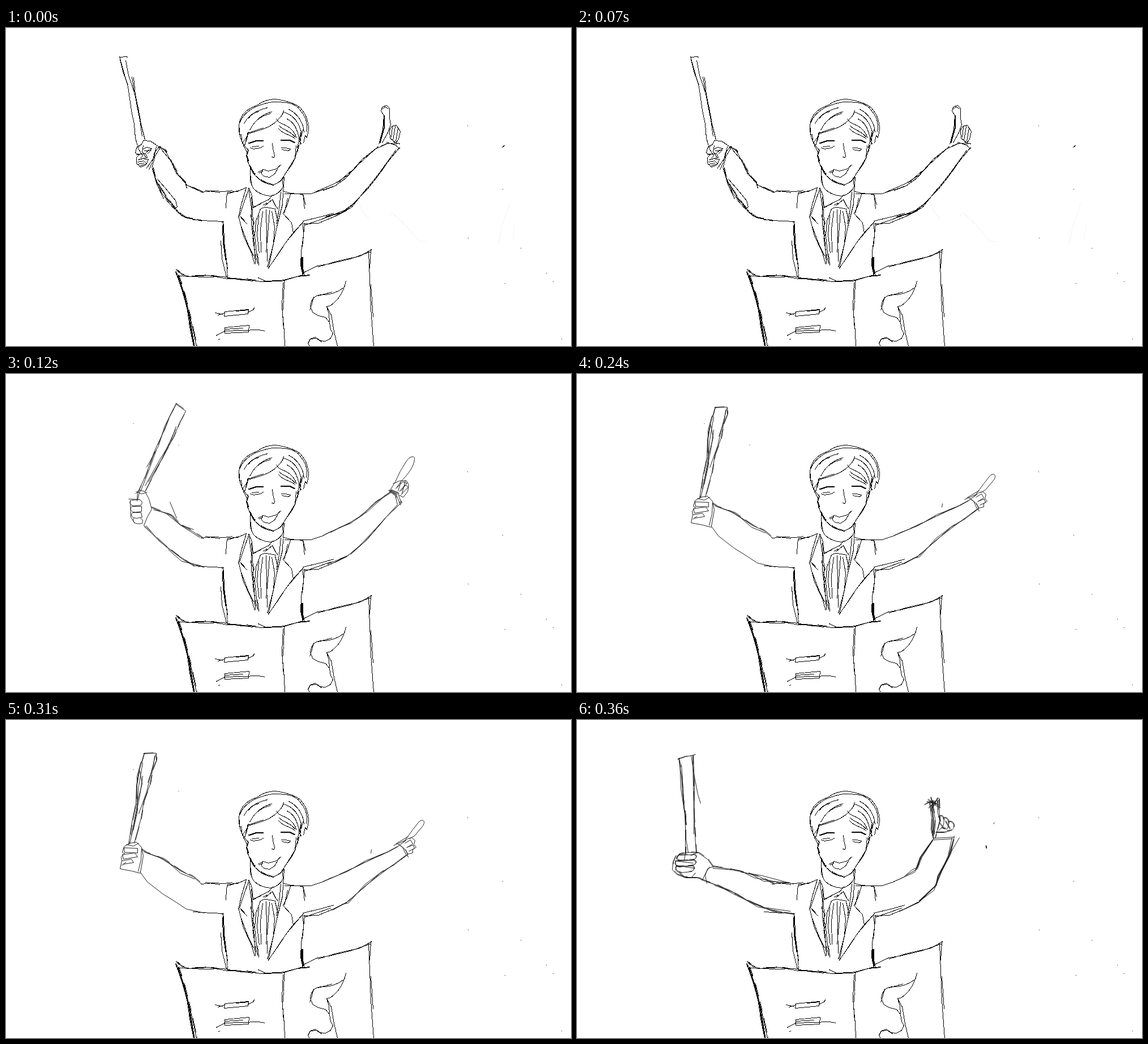
Animation of 998 by 561 pixels, one loop 480 ms. Source, as an HTML page:

```html
<!DOCTYPE html>
<html lang="en">
<head>
<meta charset="utf-8">
<title>Conductor</title>
<style>
html, body { margin: 0; width: 100%; height: 100%; overflow: hidden; background: #fff; }
svg { display: block; width: 998px; height: 561px; }
path { fill: none; stroke: #000; stroke-width: 1; shape-rendering: crispEdges; }
.soft path { stroke: #222; shape-rendering: auto; }
path.bold { stroke-width: 2; }
path.heavy { stroke-width: 4; }
path.faint { stroke: #f3f3f3; }
path.retrace { stroke-dasharray: 17 13 25 9; }
</style>
</head>
<body>
<svg viewBox="0 0 998 561">
<g transform="translate(.5 .5)">
  <g id="head">
    <path d="M420 207 C413 195 409 181 412 165 C416 149 428 141 443 136 C454 127 466 125 476 125 C491 127 510 132 519 140 C529 151 536 166 533 185 L531 193 L528 189 L525 203"/>
    <path d="M413 192 L411 170 C417 153 425 148 437 140 C455 132 472 127 489 131 C504 131 515 137 521 147 C529 156 533 167 530 183"/>
    <path d="M427 186 C444 181 466 176 478 163 C485 157 490 151 490 144 M426 185 C435 183 446 177 455 176 M430 180 C438 164 450 152 470 147 M440 165 C449 155 459 153 468 150 M420 169 C424 157 439 145 462 140 M427 160 C433 151 439 148 447 147"/>
    <path d="M477 160 L482 166 C493 171 507 175 513 194 M482 172 C489 180 503 181 511 193 M481 177 C489 188 504 187 511 196 M490 148 C505 152 519 165 522 190 M499 143 C514 150 525 166 526 184 M496 160 C510 167 514 179 518 197 M514 211 L521 181 L519 206 M525 177 L518 200 L522 205 M415 187 L417 203 L425 191"/>
    <path class="rough" d="M427 184 L421 207 L427 216 L424 225 L429 241 C433 254 444 267 458 273 L471 277 L484 270 L496 252 C508 237 512 225 516 207"/>
    <path d="M419 207 L425 218 L426 234 L437 257 L452 271 M512 207 L510 229 L499 247 L491 259 L488 269"/>
    <path class="bold" d="M428 203 L440 199 L455 198 M484 197 L500 197 L510 202"/>
    <path d="M431 211 L437 213 L449 211 L455 207 M434 209 L447 208 M485 211 L493 211 L503 213 M487 214 L498 216 L502 214"/>
    <path d="M470 203 L471 212 L474 225 L473 228 L469 227 M445 254 L454 249 L463 252 L477 248 L486 240 M452 250 L451 257 L455 261 L465 263 L474 257 L480 247 M447 255 L454 252"/>
  </g>
  <g id="suit">
    <path d="M431 246 L431 270 L436 282 C444 291 457 296 468 296 C479 293 486 286 489 279 L487 264 M431 257 L434 279 M491 263 L489 289"/>
    <path d="M429 282 L434 296 L436 317 L449 309 L464 302 L470 294 M436 315 L450 310 M457 313 L470 302 L476 314 L481 320 M454 312 L461 308 M447 321 C454 312 467 318 477 319"/>
    <path d="M388 318 L389 298 L391 289 L408 288 L424 281 M391 292 L411 286 M424 281 L415 311 L411 330 L426 346 M428 284 L419 310 L412 331 L421 339"/>
    <path d="M410 331 L419 366 L433 396 L439 417 M414 347 L426 379 L437 402 M428 282 L433 317 L433 346 L438 380 L440 416 M433 298 L436 340 L436 374 L441 409"/>
    <path d="M434 317 L432 333 L438 343 L434 352 L439 361 L435 372"/>
    <path d="M489 290 L488 310 L478 350 L463 424 M485 289 L482 319 L477 346 M502 293 L496 312 L489 327 L504 343 L507 362 M497 300 L491 327"/>
    <path d="M525 341 L505 363 L493 379 L462 425 M518 349 L495 376 L478 402"/>
    <path d="M449 319 L441 340 L439 366 L444 416 M446 330 L443 364 L447 397 M453 323 L449 355 L450 396 M459 320 L460 366 L461 412 M465 321 L463 351 L459 396 M469 323 L474 350 L472 380 L461 422 M475 321 L480 341 M444 398 L446 419"/>
    <path d="M490 288 L503 291 L524 293 L529 312 M524 292 L527 319 M491 292 L538 292 L562 284"/>
    <path d="M379 341 L383 342 L383 372 L389 408 L391 441 M384 346 L385 377 L391 425 M379 375 L381 406 L389 439"/>
    <path class="bold" d="M382 348 L384 382 L388 409"/>
    <path d="M524 343 L525 365 L521 393 L520 419 L527 436 M527 344 L523 386"/>
    <path class="heavy" d="M522 403 L522 421 L525 434"/>
  </g>
  <g id="stand">
    <path class="rough" d="M300 426 L309 434 L324 438 L358 436 L390 442 L423 443 L450 447 L487 446 L514 438 L536 436"/>
    <path d="M304 437 L350 439 L383 438 L408 443 L436 446 M445 440 L460 447 L492 444 L524 435"/>
    <path d="M525 431 L550 419 L569 416 L607 407 L645 394 M551 421 L584 411 L625 402 L646 390 M640 394 L642 442 L644 494 L649 561 M644 390 L642 424 M644 452 L648 510"/>
    <path class="rough" d="M299 430 L309 456 L319 490 L324 527 L331 561 M304 436 L314 467 L326 514 L336 561"/>
    <path class="bold" d="M303 438 L314 472 L323 507 L332 561"/>
    <path d="M491 444 L490 479 L488 503 L491 535 L492 561 M489 449 L487 490 L490 531"/>
    <path d="M369 502 L383 505 M374 506 L386 502 M386 500 L428 496 L427 504 L385 508 Z M406 499 L428 497 M427 501 L436 497 L438 493 M371 542 L386 534 M386 528 L429 524 L428 536 L386 538 Z M386 531 L419 529 M386 534 L446 532 L457 534 M375 549 L378 548"/>
    <path d="M600 446 L597 457 C590 462 577 470 562 470 C545 469 539 477 537 490 L541 501 L551 507 L564 510 L571 519 L573 532 L577 538 L573 547 L564 552 L553 551 L546 545 L537 548 L533 556 L536 561"/>
    <path d="M599 450 C594 470 584 481 573 489 L566 491 L574 506 L579 535 L585 561 M566 491 L570 504 L571 518 M543 474 L539 489 L536 498 M551 472 L576 465 M537 548 L549 547 L558 554"/>
  </g>
  <path d="M814 172h1 M876 284h1 M815 370h1 M908 388h1 M880 450h1 M953 432h1 M965 447h1 M980 548h1"/>
  <g id="shoulders">
    <path d="M344 289 L365 287 L385 288 L400 286 M330 338 L362 340 L385 341 M352 286 L378 290"/>
    <path d="M524 340 L554 333 L579 326 M526 345 L551 344 L580 332 L602 321 M528 347 L548 340 L574 331"/>
  </g>

  <g class="pose">
    <path d="M200 51 L213 50 L214 52 M200 50 L206 72 L215 103 L221 145 L226 169 L228 194 L232 207 M201 55 L207 79 L215 100 M211 57 L216 83 L227 116 L235 157 L245 197 M222 86 L226 112 L233 140 L240 191 M225 87 L228 117 L237 162"/>
    <path d="M231 209 L239 205 L242 198 L255 199 L265 206 L271 210 M236 209 L230 211 L228 220 L235 223 L230 228 L230 238 L237 245 L247 241 L251 231 L243 231 M230 223 L246 221 L249 228 L233 232 M232 236 L243 234 L248 239 L236 243"/>
    <path d="M241 213 L248 210 L257 212 L247 219 M244 216 L256 215 L249 222 M233 212 L241 225 L236 230 M242 207 L240 218 L247 228 M231 240 L244 238"/>
    <path d="M271 208 L262 219 L258 236 L252 250 M265 209 L261 228 L247 248 M273 209 L263 225 L257 247"/>
    <path class="rough" d="M270 210 L281 216 L294 241 L306 262 L321 278 L348 290 M259 247 L264 269 L280 294 L302 324 L316 334 L346 340"/>
    <path d="M274 214 L290 233 L301 257 L316 271 L319 283 M317 276 L341 286 M263 263 L275 292 L294 312 L310 331 L331 337 M267 266 L286 288 L299 304 L302 315 L297 319 L282 302 M258 248 L266 275 L278 301"/>
    <path class="rough" d="M560 286 L581 278 L599 265 L622 240 L652 213 L674 203 L691 204 M694 211 L672 238 L659 257 L638 284 L610 312 L591 326 L563 333"/>
    <path d="M543 290 L580 274 L604 259 L629 231 L658 208 M585 273 L610 251 M688 215 L660 254 L630 292 L605 318 L575 330 M637 282 L609 317 L595 323"/>
    <path d="M658 205 L665 179 L667 154 L662 146 L664 139 L672 136 L677 141 L677 159 L679 170 L674 184 L664 202 M663 143 L669 139 L676 142"/>
    <path class="bold" d="M667 153 L667 177 L660 202"/>
    <path d="M677 180 L681 173 L689 171 L696 182 L693 196 L688 202 L678 194 Z M682 174 L680 193 M687 173 L683 198 M692 176 L688 200 M672 201 L687 206 L696 213 M684 201 L696 204"/>
    <path d="M876 210 L881 206"/>
    <path class="faint" d="M625 310 L629 322 L641 337 M676 331 L681 325 L705 347 L728 375 L742 377 M869 381 L875 350 L889 310 M895 373 L899 344"/>
  </g>

  <g class="pose soft">
    <path class="rough" d="M299 52 L317 65 L306 86 L295 112 L282 136 L266 166 L245 207 M300 52 L288 75 L278 101 L262 135 L246 179 L232 209"/>
    <path d="M296 61 L280 91 L269 126 L248 164 M300 92 L290 120 L271 151 L245 197 M265 134 L249 177 L237 207 M299 97 L275 149 L251 190"/>
    <path d="M228 211 L235 204 L245 207 L252 220 L257 238 L249 252 L243 267 M229 207 L239 211 L249 208 M216 220 L236 221 M222 222 C215 224 219 233 227 232 L238 231 Q243 225 235 221 Z M222 233 C216 239 223 245 231 243 L239 242 L239 233 Z M223 244 C219 249 222 254 231 254 L240 252 L238 244 Z M225 254 C222 263 231 265 240 263 Q243 256 237 254 M232 207 L231 224 M236 205 L232 221 M219 222 L220 252 L227 263"/>
    <path class="rough" d="M256 235 L273 242 L293 250 L308 266 L329 277 L348 290 M243 268 L258 282 L282 304 L311 326 L331 338"/>
    <path d="M260 239 L288 246 L306 265 L331 274 M283 246 L309 267 L342 288 M247 267 L270 294 L297 315 L322 332 L350 341 M286 309 L310 330 L345 338"/>
    <path class="rough" d="M559 285 L583 273 L608 263 L631 247 L650 227 L681 206 M694 230 L670 253 L651 276 L629 299 L602 321 L567 335"/>
    <path d="M573 279 L608 261 L637 243 L666 217 M625 250 L656 224 L679 209 M691 230 L660 264 L638 291 L608 318 M666 258 L632 294 L617 310 L600 322"/>
    <path class="rough" d="M675 205 L689 212 L696 231 M678 204 L692 210 L698 228 M677 207 L687 214 L691 230"/>
    <path d="M679 203 L687 190 L696 171 L707 153 C713 144 722 143 721 150 C720 163 710 176 698 188 L688 202 M683 193 L695 188 L707 188 L711 195 L709 207 L701 217 L694 213 M690 200 L700 190 L708 192 L697 206 M694 207 L705 195 L710 199 L697 213 M697 190 L692 206 M705 187 L699 211"/>
    <path d="M224 87h1 M304 125h1 M289 225 L301 254"/>
  </g>

  <g class="pose soft">
    <path class="rough" d="M242 59 L265 58 L265 71 L258 89 L254 113 L243 143 L238 173 L226 217 M243 60 L234 92 L230 115 L229 146 L222 180 L216 219"/>
    <path d="M264 60 L255 96 L248 126 L234 165 M238 73 L231 99 L231 137 L232 159 L224 195 M241 75 L234 116 L230 157 L221 204 M236 90 L240 112 L230 150 M241 98 L236 132 L226 182 L218 218 M262 63 L260 80 L250 110"/>
    <path d="M208 223 L218 217 L230 215 L239 224 L242 239 L237 268 M208 223 L205 233 L209 235 L203 241 L204 248 L201 262 L222 266 L237 270 M208 225 L232 226 L232 234 L209 233 Z M205 237 L227 234 L232 241 L207 245 Z M204 248 L221 245 L225 251 L206 254 M212 219 L224 222 L234 217 M239 226 L238 246 L233 267 M204 256 L212 250"/>
    <path class="rough" d="M239 228 L248 234 L278 245 L308 266 L330 276 L345 289"/>
    <path d="M243 232 L269 241 L295 257 L318 270 M284 249 L308 270 L333 280 M236 267 L249 285 L276 306 L300 321 L318 333 L350 340"/>
    <path class="rough" d="M559 285 L587 273 L615 260 L653 241 L675 232 L693 222 M709 237 L685 255 L660 270 L633 294 L600 322 L576 335"/>
    <path d="M569 280 L602 267 L636 247 L662 238 L691 223 M635 250 L674 232 M706 238 L671 264 L633 293 L604 320 M666 265 L633 290 L605 322 L592 325"/>
    <path d="M690 217 L700 224 L707 239 M694 219 L706 229 L710 242 M684 221 L704 212 L718 193 L729 179 C736 173 741 178 736 186 L721 204 L712 209 M688 218 L710 205 M692 222 L706 212"/>
    <path d="M700 216 L709 209 L716 207 L722 212 L720 219 L724 224 L718 228 L718 234 L710 236 L704 228 M704 217 L714 211 L718 218 L707 225 M708 224 L719 220 L721 226 L711 231"/>
    <path d="M224 87h1 M304 125h1 M645 228 L644 235"/>
  </g>

  <g class="pose soft">
    <path class="rough" d="M177 69 L192 64 L208 61 M179 67 L184 98 L187 140 L191 169 L191 236 M204 62 L205 117 L206 168 L210 235"/>
    <path d="M181 70 L183 120 L190 167 L192 209 L196 234 M184 78 L189 155 L193 185 M205 65 L207 114 L206 201 M201 62 L206 95 L213 131 L218 147"/>
    <path class="rough" d="M175 244 L180 236 L196 233 L214 234 L230 245 L240 259 M174 239 L169 250 L168 264 L176 272 L192 278 L211 278 L223 281 M178 238 Q171 246 181 248 L206 246 Q214 240 206 237 Z M174 248 Q169 256 180 259 L205 256 Q214 250 205 247 Z M174 258 Q171 267 183 269 L202 267 Q210 261 203 257 Z M180 269 L188 277 L202 277 L208 270"/>
    <path d="M172 248 L205 252 M174 256 L207 261 M191 234 L189 247 M209 235 L200 239 M240 258 L230 262 L226 274 L229 288 M234 258 L227 269 L221 282"/>
    <path class="rough" d="M239 258 L266 262 L293 268 L322 276 L348 289 M218 281 L249 292 L281 309 L313 324 L345 337 L382 342"/>
    <path d="M239 261 L287 265 L313 278 L352 285 M289 268 L326 274 L382 289 M303 269 L329 284 L375 286 M228 284 L270 300 L306 322 L330 330 M242 291 L282 306 L318 329 L362 338 M301 317 L329 330 L377 337"/>
    <path d="M558 285 L576 277 L591 264 L602 259 L609 241 L630 208 M563 283 L596 268 L605 247 L628 212 M580 274 L601 262 L606 242 L621 220"/>
    <path class="bold" d="M598 264 L606 242 L628 211"/>
    <path d="M629 208 L651 207 L666 206 M629 211 L663 209 M666 204 L660 235 L643 268 L634 291 L604 321 L570 337 M662 207 L655 239 L631 294 L601 323 M675 207 L657 238 L638 279 L630 300 L598 324"/>
    <path class="bold" d="M665 210 L656 241 L637 275 L634 291 L604 319"/>
    <path class="rough" d="M622 146 L626 171 L625 193 L629 210 M627 148 L632 174 L629 209 M639 139 L640 178 L632 208 M636 142 L637 164 L641 179 M613 149 L626 143 L640 142 M619 140 L632 150 L641 154 M620 155 L639 137 M624 136 L629 153 L636 137 M617 144 L640 150"/>
    <path class="bold" d="M626 149 L629 177 L628 204 M624 143 L635 147"/>
    <path class="rough" d="M637 171 C646 163 650 177 646 187 L638 195 M646 173 C655 169 659 183 653 192 L643 190 M655 179 C665 177 668 189 662 193 L653 195 M633 198 L648 198 L662 194 M639 181 L648 192 M650 178 L658 192"/>
    <path d="M737 180 L735 183"/>
    <path class="bold" d="M722 221 L723 226"/>
  </g>
</g>
</svg>
<script>
const poses = document.querySelectorAll(".pose");
const POSE_MS = 120;

// A broken second stroke beside the first gives the sketched look.
document.querySelectorAll(".rough").forEach(path => {
  const retrace = path.cloneNode();
  retrace.setAttribute("class", "retrace");
  retrace.setAttribute("transform", "translate(1 -1)");
  path.after(retrace);
});

function draw() {
  const current = Math.floor(performance.now() / POSE_MS) % poses.length;
  poses.forEach((pose, i) => { pose.style.display = i === current ? "" : "none"; });
  requestAnimationFrame(draw);
}
draw();
</script>
</body>
</html>
```
